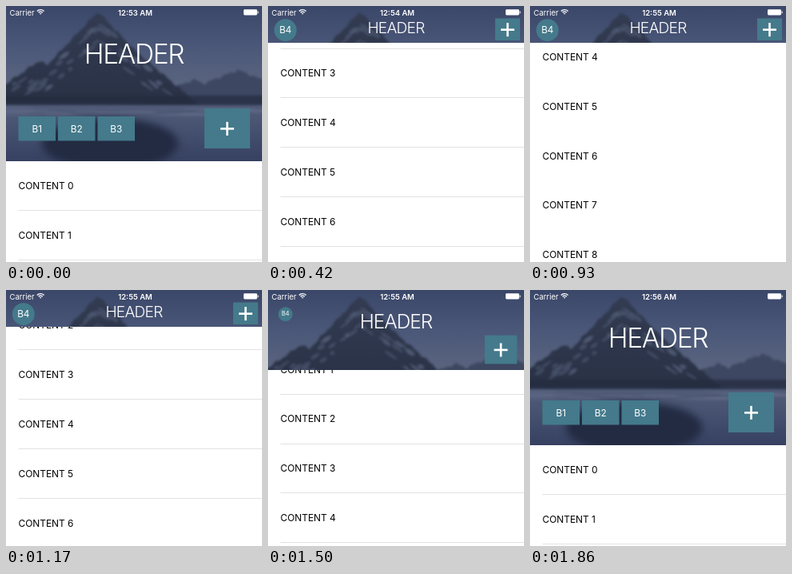
Animation of 320x320 px, one loop 1.95 s. Source, as an HTML page with a canvas:

```html
<!DOCTYPE html>
<html>
<head>
<meta charset="utf-8">
<style>
html, body { margin: 0; width: 100%; height: 100%; overflow: hidden; background: #fff; }
canvas { display: block; width: 320px; height: 320px; }
</style>
</head>
<body>
<canvas id="stage"></canvas>
<script>
const LOOP = 1950, STEP = 30, ROW = 61.87, FULL = 193.6, BAR = 46;
const TEAL = '#447a8b', DARK = '#293145';
// time in ms, scroll offset in px
const SCROLL = [[0, 0], [240, 191.7], [530, 408.5], [960, 408.5], [1170, 304.6], [1500, 187.2], [1860, 0]];

const dpr = window.devicePixelRatio || 1;
const canvas = document.getElementById('stage');
canvas.width = canvas.height = 320 * dpr;
const screen2d = canvas.getContext('2d');
let ctx = screen2d;

const clamp = v => Math.max(0, Math.min(1, v));
const mix = (a, b, p) => a + (b - a) * p;

function scrollAt(t) {
  const i = Math.max(1, SCROLL.findIndex(([time]) => t <= time));
  const [t0, s0] = SCROLL[i - 1], [t1, s1] = SCROLL[i];
  return mix(s0, s1, (t - t0) / (t1 - t0));
}

function rect(x, y, w, h, color) {
  ctx.fillStyle = color;
  ctx.fillRect(x, y, w, h);
}

function ellipse(x, y, rx, ry, color, angle = 0) {
  ctx.fillStyle = color;
  ctx.beginPath();
  ctx.ellipse(x, y, rx, ry, angle, 0, Math.PI * 2);
  ctx.fill();
}

function text(str, x, y, size, { align = 'center', weight = 400, color = '#fff', spacing = 0 } = {}) {
  ctx.font = `${weight} ${size}px Inter, Roboto, sans-serif`;
  ctx.letterSpacing = spacing * size + 'px';
  ctx.textAlign = align;
  ctx.fillStyle = color;
  ctx.fillText(str, x, y);
}

function gradient(y0, y1, ...colors) {
  const g = ctx.createLinearGradient(0, y0, 0, y1);
  colors.forEach((c, i) => g.addColorStop(i / (colors.length - 1), c));
  return g;
}

function seeded(seed) {
  return () => (seed = seed * 16807 % 2147483647) / 2147483647;
}

// skyline of overlapping peaks, each given as x, y and slope
const skyline = peaks => x =>
  Math.min(...peaks.map(([px, py, slope]) => py + slope * Math.abs(x - px))) + 2 * Math.sin(x * .5) * Math.sin(x * .17);

function ridge(yAt, base, color) {
  ctx.fillStyle = color;
  ctx.beginPath();
  ctx.moveTo(-10, base);
  for (let x = -10; x <= 330; x += 3) ctx.lineTo(x, Math.min(base, yAt(x)));
  ctx.lineTo(330, base);
  ctx.fill();
}

function paintLandscape() {
  const random = seeded(11), shore = 122;
  const main = skyline([[115, 7, 1.05], [150, 46, .85], [42, 68, .7]]);
  const layer = document.createElement('canvas');
  layer.width = 320 * dpr;
  layer.height = 200 * dpr;
  ctx = layer.getContext('2d');
  ctx.scale(dpr, dpr);
  rect(0, 0, 320, 200, gradient(0, 200, '#3b4769', '#4a5778', '#5a657f', '#475371', '#343e5f'));
  ctx.filter = `blur(${1.5 * dpr}px)`;
  ridge(skyline([[290, 80, .4], [235, 92, .4]]), shore, '#3d4761');
  ridge(main, shore, gradient(0, shore, '#333c52', DARK));
  // snow fields lying along the slopes
  for (let i = 0; i < 60; i++) {
    const x = 10 + random() * 200, y = main(x) + 8 + random() * 30;
    if (y < 108) ellipse(x, y, 3 + random() * 7, 1.5 + random() * 1.5, 'rgba(112,126,154,.3)', x < 115 ? -.6 : .6);
  }
  rect(-10, 112, 340, 12, 'rgba(36,44,64,.75)');
  // mirrored mountain, broken up by pale ripples
  ctx.filter = `blur(${5 * dpr}px)`;
  ellipse(130, 172, 85, 32, '#222b42');
  ctx.filter = `blur(${1.5 * dpr}px)`;
  for (let i = 0; i < 16; i++) {
    ellipse(random() * 320, 127 + random() * 10, 20 + random() * 30, 1.2, 'rgba(112,122,148,.35)');
  }
  ctx = screen2d;
  return layer;
}
const landscape = paintLandscape();

function statusBar(clock) {
  text('Carrier', 4.5, 11.6, 9.5, { align: 'left' });
  text(clock, 161.5, 11.6, 9.5, { weight: 600 });
  ctx.strokeStyle = '#fff';
  ctx.lineWidth = 1.4;
  for (const r of [1, 3.5, 6]) {
    ctx.beginPath();
    ctx.arc(43.2, 10.6, r, -Math.PI * .76, -Math.PI * .24);
    ctx.stroke();
  }
  ctx.fillStyle = '#fff';
  ctx.beginPath();
  ctx.roundRect(297, 4.3, 17, 7.2, 1.4);
  ctx.fill();
  rect(314.6, 6.5, 1, 2.8, '#fff');
}

function list(scroll, lineAlpha) {
  for (let i = 0; i < 13; i++) {
    const y = FULL + ROW * i - scroll;
    text('CONTENT ' + i, 15.5, y + 35.3, 11.9, { align: 'left', color: '#000' });
    rect(15.5, Math.round(y + ROW - .4), 304.5, 1, `rgba(226,226,228,${lineAlpha})`);
  }
}

function header(height, clock) {
  const p = (FULL - height) / (FULL - BAR);
  ctx.save();
  ctx.beginPath();
  ctx.rect(0, 0, 320, Math.round(height));
  ctx.clip();
  ctx.drawImage(landscape, 0, 0, 320, 200);

  ctx.globalAlpha = clamp(1 - p * 2);
  ['B1', 'B2', 'B3'].forEach((name, i) => {
    const x = 15.5 + 49.5 * i, y = height - 55.6;
    rect(x, y, 46.5, 30.5, TEAL);
    text(name, x + 23.2, y + 19.6, 11.8);
  });
  ctx.globalAlpha = 1;

  ctx.save();
  ctx.translate(21.8, 30.2);
  ctx.scale(p, p);
  ellipse(0, 0, 14, 14, TEAL);
  text('B4', 0, 3.6, 11.8);
  ctx.restore();

  ctx.save();
  ctx.translate(160, mix(59.5, 27.5, p));
  const k = mix(1, .571, p);
  ctx.scale(k, k);
  text('HEADER', 0, 12, 33.5, { weight: 350, spacing: -.04 });
  ctx.restore();

  const x = mix(248, 284, p), y = mix(128, 15.5, p);
  const w = mix(57, 31, p), h = mix(50, 27.5, p);
  const cx = x + w / 2, cy = y + h / 2 + .4;
  rect(x, y, w, h, TEAL);
  rect(cx - 8.5, cy - 1.3, 17, 2.6, '#fff');
  rect(cx - 1.3, cy - 8.5, 2.6, 17, '#fff');

  statusBar(clock);
  ctx.restore();
}

function draw() {
  const t = Math.floor(performance.now() % LOOP / STEP) * STEP;
  const scroll = scrollAt(Math.min(t, 1860));
  const minute = 53 + Math.floor((t + 740) / 800);
  // separators fade while the list rests at its end
  const lineAlpha = t < 960 ? clamp((900 - t) / 240) : 1;
  ctx.setTransform(dpr, 0, 0, dpr, 0, 0);
  rect(0, 0, 320, 320, '#fff');
  list(scroll, lineAlpha);
  header(Math.max(BAR, FULL - scroll / 2), '12:' + minute + ' AM');
  requestAnimationFrame(draw);
}
draw();
</script>
</body>
</html>
```
